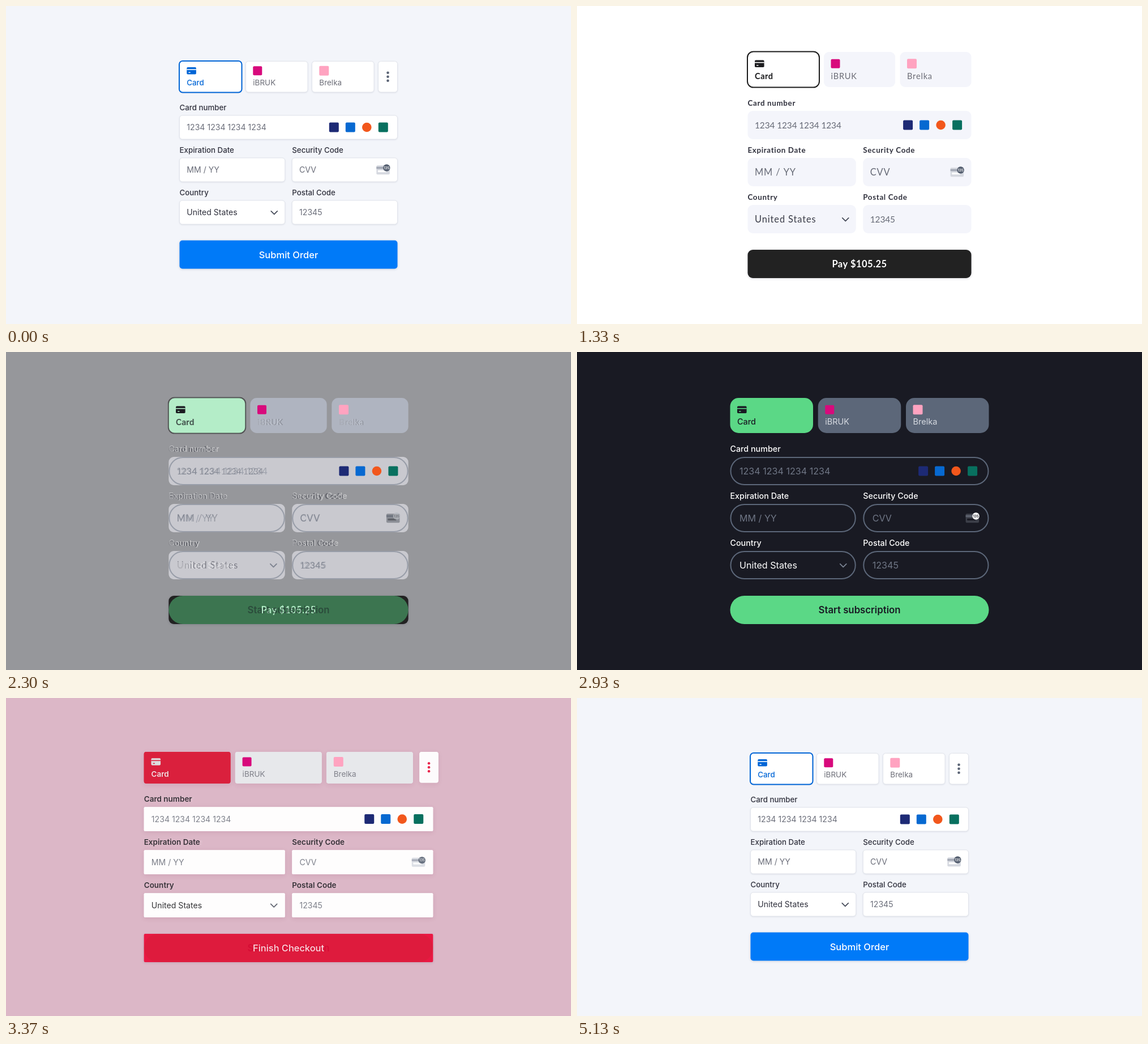
An HTML page with a canvas that plays this animation: 998x561 px, repeating every 5160 ms.

```html
<!DOCTYPE html>
<html lang="en">
<head>
<meta charset="utf-8">
<title>Checkout themes</title>
<style>
  html, body { margin: 0; width: 100%; height: 100%; overflow: hidden; background: #f3f5fa; }
  canvas { display: block; width: 998px; height: 561px; }
</style>
</head>
<body>
<canvas id="stage"></canvas>
<script>
const W = 998, H = 561, LOOP = 5160, MORPH = 500;
const STARTS = [830, 2065, 2997, 4350];
const canvas = document.getElementById('stage');
const ctx = canvas.getContext('2d');
const dpr = window.devicePixelRatio || 1;
canvas.width = W * dpr;
canvas.height = H * dpr;

const INTER = 'Inter, "Noto Sans", sans-serif';
const LATO = 'Lato, "Open Sans", sans-serif';
const font = (weight, size, family = INTER, spacing = 0) => ({ weight, size, family, spacing });

// geo values and tint colours are interpolated; everything else cross-fades
const light = {
  geo: { x: 306.5, w: 385, tabW: 109.5, gap: 7.5, tabY: 97.5, tabH: 54.5, tabR: 5, iconY: 114.3, tabText: 135.5,
    labelY: 179.2, labelStep: 74.9, fieldY: 193, fieldH: 42, step: 75, pad: 12.8, chev: 19,
    btnY: 413.5, moreX: 657.5, moreW: 34, moreA: 1 },
  tint: { bg: '#f3f5fa', on: '#ffffff', off: '#ffffff', icon: '#0065d6', dots: '#5b6475' },
  ring: '#0065d6', ringR: 6, edge: '#e1e4eb', edgeW: 1, fieldR: 5, field: '#ffffff',
  shadow: 'rgba(30,40,70,.13)', blur: 3, drop: 1,
  onText: '#0065d6', offText: '#6d6e78', label: '#30313d', hint: '#6a6d79', value: '#30313d', chevron: '#454a58',
  btn: '#007af8', btnText: '#ffffff', btnR: 5, caption: 'Submit Order',
  fonts: { on: font(500, 13.3), off: font(400, 13.5), label: font(500, 13.3), text: font(400, 14.1),
    digits: font(400, 14.1), btn: font(500, 16.5) },
  cvv: ['#d6d9e0', '#a4a9b5', '#555f70', '#ffffff']
};

const mono = {
  geo: { x: 301.5, w: 395, tabW: 126, gap: 8.5, tabY: 81, tabH: 62, tabR: 9, iconY: 101.8, tabText: 124,
    labelY: 171, labelStep: 83.2, fieldY: 185, fieldH: 50, step: 83, pad: 12.5, chev: 18.5,
    btnY: 430, moreX: 653, moreW: 34, moreA: 0 },
  tint: { bg: '#ffffff', on: '#ffffff', off: '#f4f5fb', icon: '#1d1d1f', dots: '#5b6475' },
  ring: '#1b1b1b', ringR: 10.5, fieldR: 9, field: '#f4f5fb',
  onText: '#1d1d1f', offText: '#6d6e78', label: '#30313d', hint: '#666a76', value: '#3b3d49', chevron: '#454a58',
  btn: '#222222', btnText: '#ffffff', btnR: 9, caption: 'Pay $105.25',
  btnShadow: true,
  fonts: { on: font(700, 14.6, LATO, .5), off: font(400, 14.6, LATO, .8), label: font(700, 13.4, LATO, .65),
    text: font(400, 16.4, LATO, .9), digits: font(400, 15.4, LATO, -.1), btn: font(700, 16.5, LATO, .45) },
  cvv: ['#d6d9e0', '#a4a9b5', '#555f70', '#ffffff']
};

const dark = {
  geo: { x: 270.5, w: 457, tabW: 146.5, gap: 8.75, tabY: 81, tabH: 62, tabR: 15, iconY: 101.8, tabText: 123,
    labelY: 170.6, labelStep: 83.2, fieldY: 185, fieldH: 50, step: 83, pad: 16.5, chev: 22.5,
    btnY: 430, moreX: 757.5, moreW: 33.5, moreA: 0 },
  tint: { bg: '#191a23', on: '#5bd886', off: '#5c6779', icon: '#191a23', dots: '#f00030' },
  edge: '#5c6779', edgeW: 2, fieldR: 25,
  onText: '#191a23', offText: '#d6dae1', label: '#ffffff', hint: '#6f7685', value: '#ffffff', chevron: '#7c8595',
  btn: '#5bd886', btnText: '#191a23', btnR: 25, caption: 'Start subscription',
  fonts: { on: font(500, 14.4), off: font(400, 14.5), label: font(500, 14.3), text: font(400, 16.1),
    digits: font(400, 16.1), btn: font(600, 16.8) },
  cvv: ['#3c3f49', '#5d626e', '#ffffff', '#191a23']
};

const pink = {
  geo: { x: 239, w: 520, tabW: 154, gap: 8.17, tabY: 97.5, tabH: 54.5, tabR: 2, iconY: 114.3, tabText: 135.5,
    labelY: 179.2, labelStep: 74.9, fieldY: 193.5, fieldH: 41.5, step: 74.8, pad: 12.6, chev: 19,
    btnY: 413.5, moreX: 725.5, moreW: 33.5, moreA: 1 },
  tint: { bg: '#fed3e4', on: '#f00030', off: '#ffffff', icon: '#ffffff', dots: '#e3002d' },
  fieldR: 2, field: '#ffffff', shadow: 'rgba(120,30,70,.14)', blur: 8, drop: 2,
  onText: '#ffffff', offText: '#6d6e78', label: '#1a1a1f', hint: '#666a76', value: '#111114', chevron: '#454a58',
  btn: '#f00030', btnText: '#ffffff', btnR: 2, caption: 'Finish Checkout',
  fonts: { on: font(600, 13.5), off: font(400, 13.5), label: font(600, 13.5), text: font(400, 14.1),
    digits: font(400, 14.1), btn: font(500, 16.4) },
  cvv: ['#d6d9e0', '#a4a9b5', '#555f70', '#ffffff']
};

const THEMES = [light, mono, dark, pink];

const lerp = (a, b, p) => a + (b - a) * p;
const channel = (hex, i) => parseInt(hex.substr(1 + 2 * i, 2), 16);
const mix = (a, b, p) => `rgb(${[0, 1, 2].map(i => Math.round(lerp(channel(a, i), channel(b, i), p)))})`;
const blend = (a, b, p, fn) => Object.fromEntries(Object.keys(a).map(k => [k, fn(a[k], b[k], p)]));

function faded(alpha, draw) {
  if (alpha <= 0.002) return;
  ctx.save();
  ctx.globalAlpha *= alpha;
  draw();
  ctx.restore();
}

function box(x, y, w, h, r, fill) {
  ctx.beginPath();
  ctx.roundRect(x, y, w, h, Math.min(r, w / 2, h / 2));
  if (fill) {
    ctx.fillStyle = fill;
    ctx.fill();
  }
}

function outline(x, y, w, h, r, color, width) {
  box(x, y, w, h, r);
  ctx.strokeStyle = color;
  ctx.lineWidth = width;
  ctx.stroke();
}

function disc(x, y, r, fill) {
  ctx.beginPath();
  ctx.arc(x, y, r, 0, Math.PI * 2);
  ctx.fillStyle = fill;
  ctx.fill();
}

// cy is the middle of the capitals
function text(str, x, cy, f, color, align = 'left') {
  ctx.font = `${f.weight} ${f.size}px ${f.family}`;
  ctx.letterSpacing = f.spacing + 'px';
  ctx.textAlign = align;
  ctx.fillStyle = color;
  ctx.fillText(str, x, cy + f.size * 0.363);
}

function castShadow(color, blur, drop) {
  ctx.shadowColor = color;
  ctx.shadowBlur = blur * dpr;
  ctx.shadowOffsetY = drop * dpr;
}

function panelShadow(th, x, y, w, h, r, fill) {
  if (!th.shadow) return;
  ctx.save();
  castShadow(th.shadow, th.blur, th.drop);
  box(x, y, w, h, r, fill);
  ctx.restore();
}

function panelEdge(th, x, y, w, h, r) {
  if (!th.edge) return;
  const d = th.edgeW === 1 ? 0 : th.edgeW / 2;
  outline(x + d, y + d, w - 2 * d, h - 2 * d, r, th.edge, th.edgeW);
}

function cardIcon(x, cy, color, gapColor) {
  box(x, cy - 6.2, 16.6, 12.4, 1.8, color);
  ctx.fillStyle = gapColor;
  ctx.fillRect(x, cy - 2.9, 16.6, 1.6);
  ctx.fillRect(x + 3.2, cy + 2.2, 3.2, 1.5);
}

function badges(right, cy) {
  const x = right - 87;
  box(x - 8.5, cy - 8.5, 17, 17, 2, '#1d2a75');
  box(x + 20.5, cy - 8.5, 17, 17, 2, '#0769d1');
  disc(x + 58, cy, 8.3, '#f2571c');
  box(x + 78.5, cy - 8.5, 17, 17, 2, '#08705f');
}

function cvvIcon(cx, cy, [card, stripe, dot, ink]) {
  box(cx - 12, cy - 7.5, 23.5, 16, 2, card);
  ctx.fillStyle = stripe;
  ctx.fillRect(cx - 12, cy - 5, 23.5, 3.6);
  box(cx - 9.5, cy + 1, 15, 3.5, 1, ink);
  disc(cx + 6, cy - 3.2, 6.2, dot);
  text('135', cx + 6, cy - 3.2, font(600, 6), ink, 'center');
}

function chevron(cx, cy, color) {
  ctx.beginPath();
  ctx.moveTo(cx - 5.5, cy - 2.6);
  ctx.lineTo(cx, cy + 2.9);
  ctx.lineTo(cx + 5.5, cy - 2.6);
  ctx.strokeStyle = color;
  ctx.lineWidth = 1.7;
  ctx.lineCap = ctx.lineJoin = 'round';
  ctx.stroke();
}

function drawTabs(g, c, layers) {
  ['Card', 'iBRUK', 'Brelka'].forEach((name, i) => {
    const x = g.x + i * (g.tabW + g.gap), fill = i ? c.off : c.on;
    const rect = [x, g.tabY, g.tabW, g.tabH, g.tabR];
    layers.forEach(([th, a]) => faded(a, () => panelShadow(th, ...rect, fill)));
    box(...rect, fill);
    layers.forEach(([th, a]) => faded(a, () => {
      if (i && th === light) panelEdge(th, ...rect);
      if (!i && th.ring) outline(x - .5, g.tabY - .5, g.tabW + 1, g.tabH + 1, th.ringR, th.ring, 2);
    }));

    const left = x + (g.pad > 13 ? lerp(12.8, 12.5, (g.pad - 13) / 3.5) : g.pad);
    if (i === 0) cardIcon(left, g.iconY, c.icon, fill);
    if (i === 1) box(left, g.iconY - 8, 16, 16, 2, '#d80a7c');
    if (i === 2) box(left, g.iconY - 8.5, 17, 17, 2, '#ffa3c0');
    layers.forEach(([th, a]) => faded(a, () =>
      text(name, left, g.tabText, i ? th.fonts.off : th.fonts.on, i ? th.offText : th.onText)));
  });
}

function drawMore(g, c, layers) {
  faded(g.moreA, () => {
    const rect = [g.moreX, g.tabY, g.moreW, 54.5, Math.min(g.tabR, 5)];
    layers.forEach(([th, a]) => faded(a, () => panelShadow(th, ...rect, '#ffffff')));
    box(...rect, '#ffffff');
    layers.forEach(([th, a]) => faded(th === light ? a : 0, () => panelEdge(th, ...rect)));
    for (let i = -1; i <= 1; i++) disc(g.moreX + g.moreW / 2, g.tabY + 27.2 + i * 7, 2.3, c.dots);
  });
}

function drawFields(g, th) {
  const half = (g.w - 12.5) / 2, second = g.x + half + 12.5, right = g.x + g.w;
  const field = (col, row, w, label, str, f, color) => {
    const y = g.fieldY + row * g.step, rect = [col, y, w, g.fieldH, th.fieldR];
    text(label, col, g.labelY + row * g.labelStep, th.fonts.label, th.label);
    if (th.field) {
      panelShadow(th, ...rect, th.field);
      box(...rect, th.field);
    }
    panelEdge(th, ...rect);
    text(str, col + g.pad, y + g.fieldH / 2, f, color);
  };
  const { text: body, digits } = th.fonts;
  field(g.x, 0, g.w, 'Card number', '1234 1234 1234 1234', digits, th.hint);
  field(g.x, 1, half, 'Expiration Date', 'MM / YY', body, th.hint);
  field(second, 1, half, 'Security Code', 'CVV', body, th.hint);
  field(g.x, 2, half, 'Country', 'United States', body, th.value);
  field(second, 2, half, 'Postal Code', '12345', digits, th.hint);
  chevron(g.x + half - g.chev, g.fieldY + 2 * g.step + g.fieldH / 2 + .4, th.chevron);
  cvvIcon(right - g.pad - 12.4, g.fieldY + g.step + g.fieldH / 2 - .3, th.cvv);
}

function drawButton(g, th) {
  ctx.save();
  if (th.shadow || th.btnShadow) castShadow('rgba(30,30,60,.16)', 4, 1);
  box(g.x, g.btnY, g.w, 50, th.btnR, th.btn);
  ctx.restore();
  text(th.caption, g.x + g.w / 2, g.btnY + 25.2, th.fonts.btn, th.btnText, 'center');
}

function stateAt(t) {
  let i = 0;
  while (i < STARTS.length && t >= STARTS[i] + MORPH) i++;
  const k = i < STARTS.length ? Math.max(0, (t - STARTS[i]) / MORPH) : 0;
  return [THEMES[i % 4], THEMES[(i + 1) % 4], (1 - Math.cos(Math.PI * k)) / 2];
}

function draw(t) {
  const [from, to, p] = stateAt(t);
  const g = blend(from.geo, to.geo, p, lerp);
  const c = blend(from.tint, to.tint, p, mix);
  const layers = [[from, 1 - p], [to, p]];

  ctx.setTransform(dpr, 0, 0, dpr, 0, 0);
  ctx.fillStyle = c.bg;
  ctx.fillRect(0, 0, W, H);

  drawTabs(g, c, layers);
  drawMore(g, c, layers);
  layers.forEach(([th, a]) => faded(a, () => drawFields(g, th)));
  badges(g.x + g.w - g.pad + 12.6 - 25 + 25 - 25, g.fieldY + g.fieldH / 2);
  faded(1 - p ** 6, () => drawButton(g, from));
  faded(p, () => drawButton(g, to));
}

const begin = performance.now();
function tick(now) {
  draw(Math.max(0, now - begin) % LOOP);
  requestAnimationFrame(tick);
}
draw(0);
requestAnimationFrame(tick);
</script>
</body>
</html>
```
